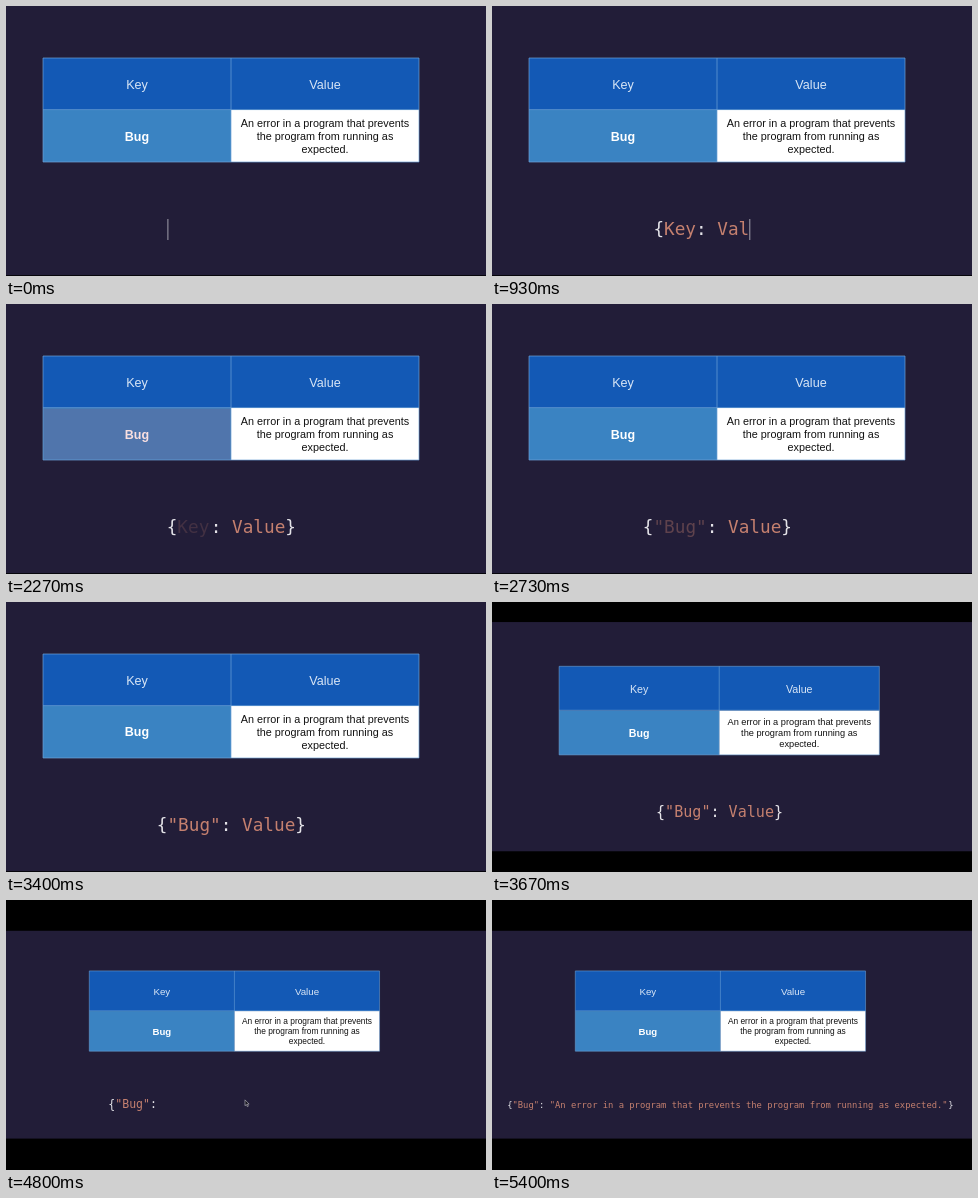
An HTML page for the animation above (5.47 s loop, 480 by 270 pixels).

```html
<!DOCTYPE html>
<html lang="en">
<head>
<meta charset="utf-8">
<title>Key and value</title>
<style>
  html, body { margin: 0; width: 100%; height: 100%; overflow: hidden; background: #000; }
  svg { display: block; width: 100vw; height: 100vh; }
  .cell { font-family: "Liberation Sans", Arial, sans-serif; text-anchor: middle; }
  .head { font-size: 12.6px; fill: #d9e6f6; }
  .bold { font-size: 12.5px; font-weight: bold; fill: #fff; }
  .body { font-size: 10.83px; fill: #111; }
  .code { font-family: "DejaVu Sans Mono", monospace; font-size: 17.7px; }
</style>
</head>
<body>
<svg viewBox="0 0 480 270">
  <rect width="480" height="270" fill="#000"/>
  <g id="world">
    <rect x="-100" width="680" height="269.2" fill="#221d38"/>
    <rect x="37" y="52" width="376" height="52" fill="#1359b5"/>
    <rect x="37" y="104" width="188" height="52" fill="#3a83c2"/>
    <rect x="225" y="104" width="188" height="52" fill="#fff"/>
    <path d="M37 52H413V156H37ZM37 103.6H413M225 52V156" fill="none" stroke="#6fa3d6" stroke-width=".7"/>
    <g class="cell">
      <text class="head" x="131" y="83">Key</text>
      <text class="head" x="319" y="83">Value</text>
      <text class="bold" x="131" y="134.5">Bug</text>
      <g class="body">
        <text x="319" y="121">An error in a program that prevents</text>
        <text x="319" y="134">the program from running as</text>
        <text x="319" y="147">expected.</text>
      </g>
    </g>
    <rect id="keyMark" x="37.5" y="104.5" width="187" height="51" fill="#d41c28"/>
    <rect id="valueMark" x="226" y="105" width="186" height="50" fill="#d41c28"/>
    <g id="code" class="code"></g>
    <rect id="caret" y="213" width="1" height="21" fill="#a19fab"/>
    <path id="cursor" d="M0 0V7.6L1.8 6 3 8.8 4.3 8.2 3.1 5.5H5.4Z" fill="#15131c" stroke="#d5d3da" stroke-width=".7"/>
  </g>
</svg>
<script>
const LOOP = 5470, ADVANCE = 17.7 * 0.602;
const PLAIN = "#e4e3e8", NAME = "#c5806f";
const $ = id => document.getElementById(id);
const lerp = (a, b, p) => a + (b - a) * p;
const ramp = (t, from, to) => Math.min(1, Math.max(0, (t - from) / (to - from)));
const ease = (t, from, to) => { const p = ramp(t, from, to); return p * p * (3 - 2 * p); };

// Each piece of code: text, colour, column before and after the key swap, opacity over time.
const on = () => 1;
const keyOut = t => 1 - ramp(t, 2030, 2330);
const bugIn = t => ramp(t, 2600, 2950);
const valueOut = t => 1 - ramp(t, 4420, 4660);
const sentenceIn = t => ramp(t, 5050, 5330);
const sentence = '"An error in a program that prevents the program from running as expected."';
const pieces = [
  ["{", PLAIN, 0, 0, on],
  ["Key", NAME, 1, 1, keyOut],
  ['"Bug"', NAME, 1, 1, bugIn],
  [":", PLAIN, 4, 6, on],
  ["Value", NAME, 6, 8, valueOut],
  ["}", PLAIN, 11, 13, valueOut],
  [sentence, NAME, 8, 8, sentenceIn],
  ["}", PLAIN, 83, 83, sentenceIn]
].map(([text, fill, before, after, alpha]) => {
  const el = document.createElementNS("http://www.w3.org/2000/svg", "text");
  el.setAttribute("fill", fill);
  $("code").append(el);
  return { el, text, before, after, alpha };
});

function drawCode(t) {
  const swap = ease(t, 2200, 2650), shrink = ease(t, 4520, 5130);
  const typed = t < 1150 ? Math.floor(12 * ramp(t, 40, 1110)) : 100;
  const x = lerp(lerp(161.4, 150.8, swap), -51.2, shrink);
  const y = lerp(229, 230.2, shrink), size = lerp(1, 0.646, shrink);
  $("code").setAttribute("transform", `translate(${x} ${y}) scale(${size})`);
  for (const p of pieces) {
    p.el.textContent = p.text.slice(0, Math.max(0, typed - p.before));
    p.el.setAttribute("x", lerp(p.before, p.after, swap) * ADVANCE);
    p.el.setAttribute("opacity", p.alpha(t));
  }
  $("caret").setAttribute("x", 161.4 + Math.min(typed, 12) * ADVANCE);
  $("caret").setAttribute("opacity", t < 1200 ? 1 : 0);
}

function drawCursor(t) {
  let x, y;
  if (t < 3000) {
    const p = ease(t, 1300, 1560);
    x = lerp(150, 125, p);
    y = lerp(128, 142, p);
  } else {
    const a = ease(t, 3780, 4040), b = ease(t, 4440, 4760);
    x = lerp(lerp(322, 336.5, a), 238.7, b);
    y = lerp(lerp(150, 137.6, a), 219, b);
  }
  const shown = (t > 1300 && t < 2000) || (t > 3800 && t < 5060);
  $("cursor").setAttribute("transform", `translate(${x} ${y})`);
  $("cursor").setAttribute("opacity", shown ? 1 : 0);
}

function draw(t) {
  const zoom = lerp(1, 0.772, ease(t, 3400, 3850));
  $("world").setAttribute("transform", `translate(240 135) scale(${zoom}) translate(-240 -135)`);
  $("keyMark").setAttribute("opacity", 0.14 * ramp(t, 1340, 1580) * (1 - ramp(t, 2300, 2510)));
  $("valueMark").setAttribute("opacity", 0.42 * ramp(t, 3920, 4060) * (1 - ramp(t, 4400, 4600)));
  drawCode(t);
  drawCursor(t);
}

const start = performance.now();
function tick() {
  draw((performance.now() - start) % LOOP);
  requestAnimationFrame(tick);
}
tick();
</script>
</body>
</html>
```
